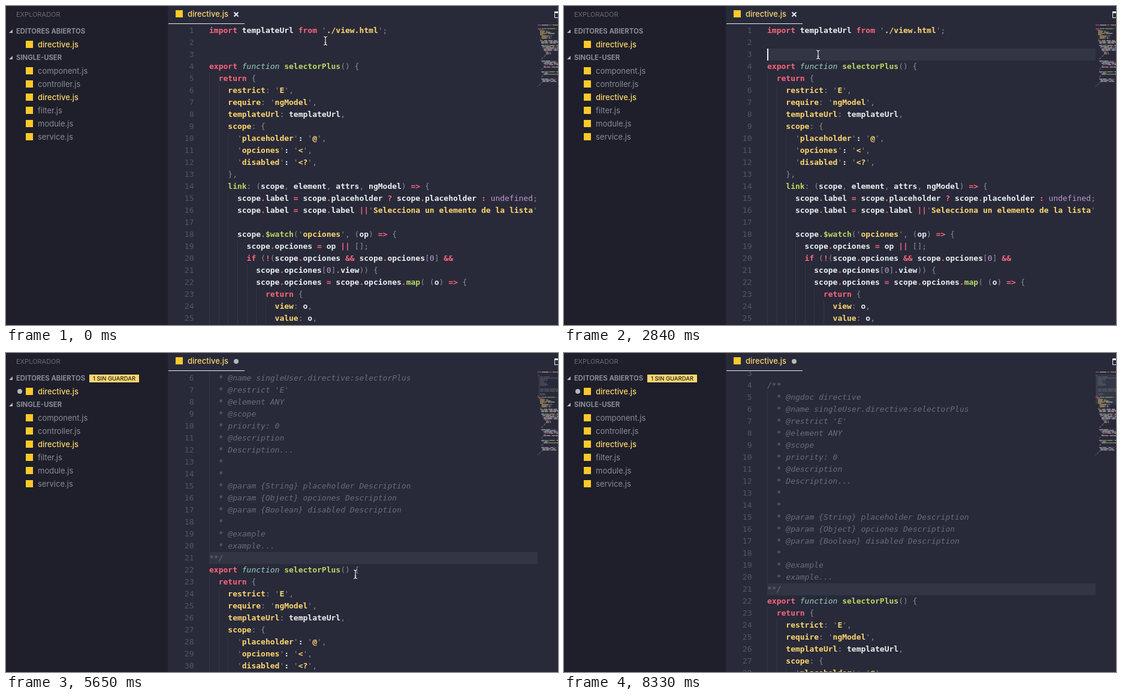
Recreate the animation shown at these times as an HTML page with a canvas. Size 921 by 532 pixels, loop 8730 ms.

```html
<!DOCTYPE html>
<html lang="es">
<head>
<meta charset="utf-8">
<style>
  html, body { margin: 0; width: 100%; height: 100%; overflow: hidden; background: #282a3a; }
  canvas { display: block; }
</style>
</head>
<body>
<canvas id="stage" width="921" height="532"></canvas>
<script>
const ctx = document.getElementById('stage').getContext('2d');
const W = 921, H = 532, LOOP = 8730;
const CODE_X = 339, TOP = 31, ROW = 20, MAP_X = 887, COL = 7.826;
const UI = 'Inter, sans-serif', MONO = '"DejaVu Sans Mono", monospace';
const C = {
  bg: '#282a3a', side: '#1e1f2b', white: '#eaf2f1', light: '#b2b9bd', gray: '#888d94',
  dim: '#696d77', faint: '#535763', line: '#3a3d4b', red: '#ff657a', yellow: '#ffd76d',
  green: '#bad761', teal: '#9cd1bb', purple: '#c39ac9', icon: '#ffca28'
};

const code = `import templateUrl from './view.html';


export function selectorPlus() {
  return {
    restrict: 'E',
    require: 'ngModel',
    templateUrl: templateUrl,
    scope: {
      'placeholder': '@',
      'opciones': '<',
      'disabled': '<?',
    },
    link: (scope, element, attrs, ngModel) => {
      scope.label = scope.placeholder ? scope.placeholder : undefined;
      scope.label = scope.label ||'Selecciona un elemento de la lista';

      scope.$watch('opciones', (op) => {
        scope.opciones = op || [];
        if (!(scope.opciones && scope.opciones[0] &&
          scope.opciones[0].view)) {
          scope.opciones = scope.opciones.map( (o) => {
            return {
              view: o,
              value: o,
            };
          });
        }
      });

      ngModel.$render = () => {
        if (ngModel.$viewValue) {
          scope.selected = scope.opciones.find((o) => {
            return o.value === ngModel.$viewValue;
          });
          scope.label = scope.selected.view;
        }
      };

      scope.$watch('selected', (item) => {
        if (item) {
          ngModel.$setViewValue(item.value);
        }
      });

      scope.select = (item) => {
        scope.selected = item;
        scope.label = item.view;
      };
    }
  };
}`.split('\n');

const doc = `/**
  * @ngdoc directive
  * @name singleUser.directive:selectorPlus
  * @restrict 'E'
  * @element ANY
  * @scope
  * priority: 0
  * @description
  * Description...
  *
  *
  * @param {String} placeholder Description
  * @param {Object} opciones Description
  * @param {Boolean} disabled Description
  *
  * @example
  * example...
**/`.split('\n');

// One style per capture group of the token pattern
const TOKEN = /('[^']*')|(link(?=:)|[\w$]+(?=\())|(\w+(?=:))|\b(import|from|export|return|if)\b|(function)|(undefined|\b\d+)|(=>|\|\||&&|[=?!.]|(?<= ):)|((?<='):|[\w$]+)|([^\s])/g;
const STYLES = [
  [C.yellow, 'bold'], [C.green, 'bold'], [C.yellow, 'bold'], [C.red, 'bold'], [C.teal, 'italic'],
  [C.purple, ''], [C.red, 'bold'], [C.white, 'bold'], [C.gray, '']
];

function tokenize(text) {
  const indent = text.search(/\S|$/);
  if (/^(\/\*|  \*|\*\*)/.test(text)) return [[indent, text.trim(), C.dim, 'italic']];
  return [...text.matchAll(TOKEN)].flatMap(m => {
    const word = m[0], i = m.index;
    const [color, weight] = STYLES[m.slice(1).findIndex(g => g !== undefined)];
    if (word[0] !== "'" || word.length < 2) return [[i, word, color, weight]];
    return [[i, "'", C.gray, ''], [i + 1, word.slice(1, -1), color, weight],
            [i + word.length - 1, "'", C.gray, '']];
  });
}

function parse(lines) {
  let indent = 0;
  return lines.map(text => {
    indent = text ? text.search(/\S/) : indent;
    return { indent, tokens: tokenize(text) };
  });
}
const plain = parse(code);
const documented = parse([...code.slice(0, 3), ...doc, ...code.slice(3)]);

const commands = [
  { label: 'ngDoc Directive', note: 'usado recientemente' },
  { label: 'ngDoc Module' }, { label: 'ngDoc Filter' },
  { label: 'ngDoc Component' }, { label: 'ngDoc Controller' },
  { label: 'Preferencias: Abrir Configuración de carpeta', detail: 'Preferences: Open Folder Settings' },
  { label: 'Preferencias: Abrir configuración de usuario', detail: 'Preferences: Open User Settings', keys: true },
  { label: 'Recargar ventana', detail: 'Reload Window' },
  { label: 'Alternando omitir este archivo', detail: 'Toggle Skipping this File', note: 'otros comandos', rule: true }
];

// Each track holds its value until the next time
const scrollTrack = [[0, 0], [4310, 35], [4460, 54], [4610, 62], [5350, 68], [5500, 82], [5650, 99],
  [5800, 112], [6250, 134], [6400, 142], [7590, 136], [7730, 122], [7880, 103], [8030, 81], [8180, 61], [8330, 47]];
const mouseTrack = [[0, [533, 58]], [150, [508, 64]], [290, [452, 77]], [440, [424, 81]],
  [3420, [430, 92]], [3570, [466, 156]], [3720, [528, 268]], [3870, [572, 346]], [4020, [583, 369]],
  [6850, [752, 452]], [6990, [867, 505]], [7290, [869, 508]], [7440, [898, 470]], [7590, null]];
const queryTrack = [[0, null], [1640, ''], [2090, 'n'], [2240, 'ng'], [2390, 'ngd'], [2540, 'ngdo'], [2840, null]];
const caretTrack = [0, 440, 890, 1340, 1640, 2840, 3420, 3870, 4310, 4910, 5350, 5800, 6250, 6850, 7290, 7730, 8180]
  .map((t, i) => [t, i % 2 === 1]);
const at = (track, t) => track.findLast(([start]) => start <= t)[1];

function rect(x, y, w, h, color) {
  ctx.fillStyle = color;
  ctx.fillRect(x, y, w, h);
}

function text(str, x, y, color, font, align = 'left') {
  ctx.font = font;
  ctx.fillStyle = color;
  ctx.textAlign = align;
  ctx.fillText(str, x, y);
}

function shape(points, color) {
  ctx.beginPath();
  points.forEach(([x, y]) => ctx.lineTo(x, y));
  ctx.closePath();
  ctx.fillStyle = color;
  ctx.fill();
}

function dot(x, y) {
  ctx.beginPath();
  ctx.arc(x, y, 4, 0, 7);
  ctx.fillStyle = C.light;
  ctx.fill();
}

function file(name, x, y, active) {
  rect(x, y - 6, 12, 12, C.icon);
  text(name, x + 20, y + 5, active ? C.yellow : C.gray, `${active ? 500 : 400} 13px ${UI}`);
}

function sidebar(dirty) {
  rect(0, 0, 270, H, C.side);
  text('EXPLORADOR', 17, 18, C.dim, `11px ${UI}`);
  [['EDITORES ABIERTOS', 42], ['SINGLE-USER', 86]].forEach(([title, y]) => {
    shape([[11, y - 3], [11, y + 3], [5, y + 3]], C.light);
    text(title, 17, y + 4, C.gray, `bold 11.3px ${UI}`);
  });
  file('directive.js', 33, 64, true);
  ['component', 'controller', 'directive', 'filter', 'module', 'service'].forEach((name, i) =>
    file(name + '.js', 33, 108 + 22 * i, name === 'directive'));
  if (!dirty) return;
  dot(23, 64);
  rect(139, 36, 83, 13, C.yellow);
  text('1 SIN GUARDAR', 145, 46, C.side, `500 9.5px ${UI}`);
}

function tab(dirty) {
  file('directive.js', 283, 13, true);
  rect(271, 29, 127, 1, C.white);
  ctx.strokeStyle = C.white;
  if (dirty) dot(384, 14);
  else {
    ctx.lineWidth = 2;
    ctx.beginPath();
    ctx.moveTo(380.5, 10.5); ctx.lineTo(387.5, 17.5);
    ctx.moveTo(387.5, 10.5); ctx.lineTo(380.5, 17.5);
    ctx.stroke();
  }
  ctx.lineWidth = 1;
  ctx.strokeRect(915.5, 9.5, 12, 10);
  rect(915, 9, 6, 3, C.white);
}

function editor(lines, scroll, current, caret) {
  ctx.save();
  ctx.beginPath();
  ctx.rect(270, TOP, MAP_X - 270, H - TOP);
  ctx.clip();
  const yOf = i => TOP + ROW * i - scroll;
  if (current !== null) rect(CODE_X, yOf(current), MAP_X - CODE_X, ROW, 'rgba(234,242,241,.05)');
  lines.forEach(({ indent, tokens }, i) => {
    const y = yOf(i);
    if (y < TOP - ROW || y > H) return;
    for (let col = 0; col < indent; col += 2) rect(Math.round(CODE_X + col * COL), y, 1, ROW, '#343747');
    text(i + 1, 313.5, y + 14, C.faint, `13px ${MONO}`, 'right');
    tokens.forEach(([col, word, color, weight]) =>
      text(word, CODE_X + col * COL, y + 14, color, `${weight} 13px ${MONO}`));
  });
  if (caret) rect(current === 2 ? CODE_X : 362, yOf(current), 2, ROW, C.white);
  ctx.restore();
}

function minimap(lines) {
  ctx.globalAlpha = 0.55;
  lines.forEach(({ tokens }, i) => tokens.forEach(([col, word, color]) =>
    [...word].forEach((ch, k) => {
      if (ch !== ' ') rect(MAP_X + col + k, TOP + 2 * i, 1, /[.,;:']/.test(ch) ? 1 : 1.5, color);
    })));
  ctx.globalAlpha = 1;
}

function matched(str, query, x, y, color) {
  const i = query ? str.toLowerCase().indexOf(query) : -1;
  const parts = i < 0 ? [str] : [str.slice(0, i), str.slice(i, i + query.length), str.slice(i + query.length)];
  parts.forEach((part, k) => {
    text(part, x, y, k === 1 ? C.white : color, `${k === 1 ? 'bold' : ''} 13px ${UI}`);
    x += ctx.measureText(part).width;
  });
}

function palette(query) {
  const items = commands.filter(c => (c.label + '\n' + (c.detail || '')).toLowerCase().includes(query));
  const listEnd = items.reduce((y, c) => y + (c.detail ? 44 : 22) + (c.rule ? 1 : 0), 33);
  const bottom = Math.min(316, listEnd + 10);
  ctx.save();
  ctx.shadowColor = 'rgba(0,0,0,.6)';
  ctx.shadowBlur = 8;
  rect(160, -4, 600, bottom + 4, C.side);
  ctx.restore();
  ctx.save();
  ctx.beginPath();
  ctx.rect(160, 0, 600, bottom);
  ctx.clip();
  rect(165, 2, 588, 25, C.dim);
  rect(166, 3, 586, 23, C.line);
  text('>' + query, 170, 20, C.white, `13px ${UI}`);
  rect(Math.round(170 + ctx.measureText('>' + query).width), 7, 1, 16, C.white);
  let y = 33;
  items.forEach((c, i) => {
    if (c.rule) rect(160, y++, 600, 1, '#2d2f3d');
    matched(c.label, query, 170, y + 16, i ? C.gray : C.white);
    if (c.detail) matched(c.detail, query, 170, y + 36, C.dim);
    if (c.note) text(c.note, 741, y + 16, C.faint, `13px ${UI}`, 'right');
    if (c.keys) {
      rect(703, y + 3, 22, 18, C.bg);
      rect(727, y + 3, 14, 18, C.bg);
      text('⌘', 714, y + 16, C.white, '11px "DejaVu Sans", sans-serif', 'center');
      text(',', 734, y + 15, C.white, `bold 11px ${UI}`, 'center');
    }
    y += c.detail ? 44 : 22;
  });
  ctx.restore();
}

function drawMouse([x, y], hand) {
  ctx.save();
  ctx.translate(x, y);
  if (hand) {
    shape([[-6, -7], [-4, -7], [-1, -2], [5, -1], [7, 1], [6, 8], [-1, 8], [-7, 1], [-5, 0], [-3, 1]], C.white);
    ctx.strokeStyle = '#000';
    ctx.lineWidth = 1;
    ctx.stroke();
    for (let k = 0; k < 3; k++) rect(0 + 2 * k, 2, 1, 4, '#000');
  } else {
    const beam = new Path2D('M-3-7Q0-7 0-5Q0-7 3-7M0-5V5M-3 7Q0 7 0 5Q0 7 3 7M-1.5 3H1.5');
    ctx.strokeStyle = 'rgba(0,0,0,.5)';
    ctx.lineWidth = 2.6;
    ctx.stroke(beam);
    ctx.strokeStyle = '#fff';
    ctx.lineWidth = 1.2;
    ctx.stroke(beam);
  }
  ctx.restore();
}

function draw(t) {
  const inserted = t >= 2990, dirty = t >= 3130;
  const scroll = at(scrollTrack, t), query = at(queryTrack, t), mouse = at(mouseTrack, t);
  const lines = inserted ? documented : plain;
  rect(0, 0, W, H, C.bg);
  sidebar(dirty);
  tab(dirty);
  editor(lines, scroll, t < 440 ? null : inserted ? 20 : 2, at(caretTrack, t));
  if (t >= 7440) rect(MAP_X, TOP + scroll / 10, W - MAP_X, 50, 'rgba(234,242,241,.06)');
  minimap(dirty ? documented : plain);
  if (query !== null) palette(query);
  if (mouse) drawMouse(query === null ? mouse : [428, 89], query !== null);
}

function tick() {
  draw(performance.now() % LOOP);
  requestAnimationFrame(tick);
}
tick();
</script>
</body>
</html>
```
